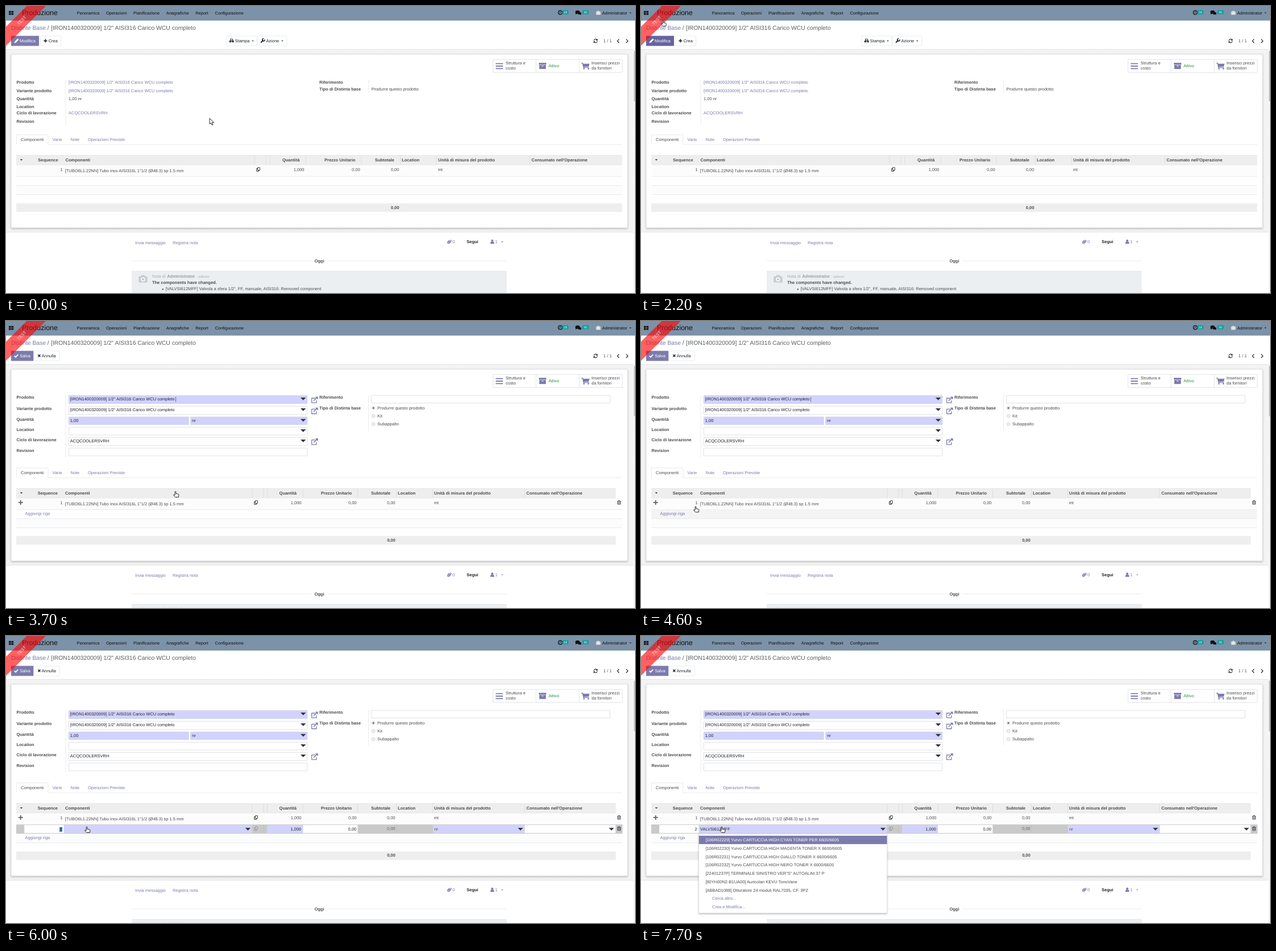
These frames come from a looping animation (1106 px wide and 506 px high, 8000 ms). An HTML page:

```html
<!DOCTYPE html>
<html lang="it">
<head>
<meta charset="utf-8">
<title>Distinta base</title>
<style>
html, body { margin: 0; width: 100%; height: 100%; overflow: hidden; background: #fff; }
svg { display: block; width: 1106px; height: 506px; }
text { font: 7.488px "Liberation Sans", Arial, sans-serif; text-rendering: geometricPrecision; white-space: pre; }
</style>
</head>
<body>
<svg id="stage" viewBox="0 0 1106 506" xmlns="http://www.w3.org/2000/svg"></svg>
<script>
const LINK = '#7c7bad', INK = '#4c4c4c', DARK = '#212529', LINE = '#dcdfe3', FIELD = '#d2d2ff';
const PRODUCT = '[IRON1400320009] 1/2" AISI316 Carico WCU completo';

// Drawing helpers, all returning markup
function text(x, y, s, { fill = INK, bold, size, anchor } = {}) {
  const style = (bold ? 'font-weight:700;' : '') + (size ? `font-size:${size}px` : '');
  return `<text x="${x}" y="${y}" fill="${fill}" text-anchor="${anchor || 'start'}" style="${style}">${s}</text>`;
}
const bold = (x, y, s, o) => text(x, y, s, { bold: true, ...o });
const link = (x, y, s) => text(x, y, s, { fill: LINK });
const right = (x, y, s, o) => text(x, y, s, { anchor: 'end', ...o });
const rect = (x, y, w, h, fill, extra = '') => `<rect x="${x}" y="${y}" width="${w}" height="${h}" fill="${fill}" ${extra}/>`;
const box = (x1, y1, x2, y2, fill = '#fff', stroke = '#c9ccd0') =>
  rect(x1 + .3, y1 + .3, x2 - x1 - .6, y2 - y1 - .6, fill, `stroke="${stroke}" stroke-width=".6" rx=".8"`);
const hline = (x1, x2, y, c = LINE) => rect(x1, y - .3, x2 - x1, .6, c);
const vline = (x, y1, y2, c = LINE) => rect(x - .3, y1, .6, y2 - y1, c);
const path = (d, fill, stroke = 'none', w = 1) => `<path d="${d}" fill="${fill}" stroke="${stroke}" stroke-width="${w}"/>`;
const at = (x, y, s) => `<g transform="translate(${x} ${y})">${s}</g>`;
const group = (id, s) => `<g id="${id}">${s}</g>`;
const tri = (x, y, w, c = DARK) => path(`M${x - w / 2},${y - w / 4}h${w}l${-w / 2},${w / 2}z`, c);

// Icons, centred on the given point
const icons = {
  pencil: c => path('M-4,4l.6-2.6L2-4l2,2L-1.4,3.4z', c),
  plus: c => path('M-3,0H3M0-3V3', 'none', c, 1.7),
  check: c => path('M-3.2,0L-1,2.3 3.3-2.2', 'none', c, 1.7),
  cross: c => path('M-2-2L2,2M2-2L-2,2', 'none', c, 1.6),
  printer: c => path('M-3.8,3v-3.4h1.2V-3.6H1.6l1,1V-.4h1.2V3z', c) + rect(-1.7, -2.6, 3.2, 2, '#fff') + rect(-1.7, 1.2, 3.4, 1.2, '#fff'),
  wrench: c => path('M-3.4,3.2L1,-1', 'none', c, 2) + path('M3.5-2.2A2.2,2.2 0 1 1 1.6-3.8', 'none', c, 1.5),
  refresh: c => path('M-3,-.4A3.1,3.1 0 0 1 2.5-2M3,.4A3.1,3.1 0 0 1-2.5,2', 'none', c, 1.1) + path('M3.6-3.8V-.6H.5zM-3.6,3.8V.6H-.5z', c),
  bars: c => [-5.2, -.9, 3.4].map(y => rect(-6.5, y, 13, 1.8, c, 'rx=".6"')).join(''),
  archive: c => rect(-6.5, -5.5, 13, 3.2, c) + rect(-5.8, -1.6, 11.6, 7, c) + rect(-1.6, -.4, 3.2, 1, '#fff'),
  cart: c => path('M-7.5-5.2h2.4L-3.4,2.6H6', 'none', c, 1.4) + path('M-4.8-4H7L5.8,1-3.6,1.6z', c) +
    `<circle cx="-2.7" cy="4.8" r="1.4" fill="${c}"/><circle cx="5" cy="4.8" r="1.4" fill="${c}"/>`,
  camera: c => path('M-4-2.2h2l.8-1.4h2.4l.8,1.4h2V3.4H-4z', c) + '<circle cy=".5" r="1.6" fill="none" stroke="#fff" stroke-width=".8"/>',
  clock: c => `<circle r="3.4" fill="none" stroke="${c}" stroke-width="1.2"/>` + path('M0-2V.6H-1.8', 'none', c, .9),
  chat: c => `<ellipse cx="-1" cy="-.8" rx="4" ry="2.9" fill="${c}"/><ellipse cx="2.6" cy="1.4" rx="3" ry="2.2" fill="${c}"/>` + path('M-4,1l-.8,2.6L-1,2zM3,3l2.4,1.4-.4-2z', c),
  clip: c => path('M1.6-1L-.9,1.5a.6,.6 0 0 1-1-1L1.2-2.5a1.3,1.3 0 0 1 1.8,1.8L-.4,2.8a1.9,1.9 0 0 1-2.7-2.7L-.6-2.5', 'none', c, 1.05),
  user: c => `<circle cy="-1.8" r="2" fill="${c}"/>` + path('M-3.4,3.6q0-3.6 2-3.6h2.8q2,0 2,3.6z', c),
  copy: c => path('M-1.2-3.2h3.8V1.6h-3.8zM-1.2-1.6h-1.8V3.4H.8V1.6', 'none', c, .9),
  trash: c => path('M-2.4-2V3.2H2.4V-2M-3.3-2.2H3.3M-1-2.4V-3.4H1V-2.4M-.9-.8V2M.9-.8V2', 'none', c, .8),
  move: c => path('M-3,0H3M0-3V3', 'none', c, 1) + path('M-4,0l1.6-1.5v3zM4,0l-1.6-1.5v3zM0-4l-1.5,1.6h3zM0,4l-1.5-1.6h3z', c),
  external: c => path('M1-3H-5V5.2H3.2V1', 'none', c, 1.3) + path('M-1.6,1.6L4-4', 'none', c, 1.6) + path('M1-5.6H6V-.6z', c),
};
const icon = (name, x, y, c = DARK) => at(x, y, icons[name](c));

function header() {
  const menu = [['Panoramica', 124.5], ['Operazioni', 176], ['Pianificazione', 224], ['Anagrafiche', 281.7], ['Report', 333.2], ['Configurazione', 367.6]];
  const badge = (x, s) => rect(x, 7.6, 11, 7, '#00a09d', 'rx="1.6"') + text(x + 5.5, 13.1, s, { fill: '#fff', size: 5.4, anchor: 'middle' });
  const tiles = [5, 9.5].flatMap(x => [8.8, 12.6].map(y => rect(x, y, 3.7, 3, '#111'))).join('');
  const crumb = (x, s, fill = '#5a5e62') => text(x, 42.2, s, { fill, size: 10.37 });
  return rect(0, 0, 1106, 25.4, '#7c92a8') + hline(0, 1106, 25.1, '#71869b') + tiles
    + text(28, 16.4, 'Produzione', { fill: '#111', size: 12.44 })
    + menu.map(([s, x]) => text(x, 14.7, s, { fill: '#111' })).join('')
    + icon('clock', 974.5, 11.5, '#111') + badge(978, 28) + icon('chat', 1006, 11.5, '#111') + badge(1013.5, 95)
    + icon('camera', 1041.5, 12, '#d5dbe0') + text(1048.3, 14.7, 'Administrator', { fill: '#111' }) + tri(1098, 12.3, 3.6, '#111')
    + crumb(9, 'Distinte Base', LINK) + crumb(72.8, '/') + crumb(79, PRODUCT)
    + icon('refresh', 1036.7, 61.6) + text(1050.6, 64.2, '1 / 1')
    + path('M1078,58.4l-3,3.3 3,3.3M1090.5,58.4l3,3.3-3,3.3', 'none', DARK, 1.2);
}

const solidButton = (x2, id) => rect(9, 52.6, x2 - 9, 17.8, LINK, `id="${id}"`);
const plainButton = (x1, x2) => box(x1, 52.6, x2, 70.4, '#fff', LINE);

function toolbarView() {
  return solidButton(58, 'modify') + icon('pencil', 18.6, 61.3, '#fff') + text(24, 64, 'Modifica', { fill: '#fff' })
    + plainButton(60, 97) + icon('plus', 69.4, 61.3) + text(74.7, 64, 'Crea', { fill: DARK })
    + plainButton(387, 441.5) + icon('printer', 396.7, 61.3) + text(402.6, 64, 'Stampa', { fill: DARK }) + tri(434, 61.6, 3.8)
    + plainButton(442, 494) + icon('wrench', 451.5, 61.3) + text(457.4, 64, 'Azione', { fill: DARK }) + tri(485.8, 61.6, 3.8);
}

function toolbarEdit() {
  return solidButton(48.3, 'save') + icon('check', 18, 61.4, '#fff') + text(24.2, 64, 'Salva', { fill: '#fff' })
    + plainButton(50, 94.5) + icon('cross', 58.4, 61.3) + text(62.8, 64, 'Annulla', { fill: DARK });
}

function sheet(dy) {
  return rect(0, 77, 1103, 322 + dy, 'url(#weave)') + hline(0, 1103, 76.7, '#cfd3d7')
    + rect(9, 85, 1084, 306 + dy, '#fff', 'stroke="#c8c8d3" stroke-width=".6" filter="url(#shade)"')
    + box(856, 94, 1084, 117.5, '#fff', '#ced0d8') + vline(932, 94, 117.5, '#ced0d8') + vline(1008, 94, 117.5, '#ced0d8')
    + icon('bars', 867.5, 106, LINK) + text(878.5, 103, 'Struttura e') + text(878.5, 111.7, 'costo')
    + icon('archive', 943.5, 105.7, LINK) + text(954, 107.7, 'Attivo', { fill: '#28953f' })
    + icon('cart', 1019, 105.8, LINK) + text(1029.5, 103, 'Inserisci prezzi') + text(1029.5, 111.7, 'da fornitori');
}

const LABELS = ['Prodotto', 'Variante prodotto', 'Quantità', 'Location', 'Ciclo di lavorazione', 'Revision'];
const labels = ys => LABELS.map((s, i) => bold(18.5, ys[i], s)).join('');

function formView() {
  return labels([137.3, 151.7, 165.7, 180.3, 191.3, 205.7]) + vline(105, 130, 210)
    + link(110, 137.3, PRODUCT) + link(110, 151.7, PRODUCT) + text(110, 165.7, '1,00 nr') + link(110, 191.3, 'ACQCOOLERSVRH')
    + bold(551, 137.3, 'Riferimento') + bold(551, 149, 'Tipo di Distinta base') + vline(637.5, 130, 154) + text(642.5, 149, 'Produrre questo prodotto');
}

function formEdit() {
  const input = (y, s, { x = 110, x2 = 530, fill = '#fff', drop = true, h = 14.3 } = {}) =>
    box(x, y, x2, y + h, fill) + text(x + 2.8, y + 9.3, s, { fill: DARK }) + (drop ? tri(522.6, y + 6.4, 9.4, '#33333f') : '');
  const radio = (y, s, on) => `<circle cx="646" cy="${y}" r="2.9" fill="#eee" stroke="#c4c4c4" stroke-width=".6"/>`
    + (on ? `<circle cx="646" cy="${y}" r="1.3" fill="#555"/>` : '') + text(653, y + 2.3, s);
  return labels([137.3, 157.3, 175.7, 194.3, 211.5, 231.3]) + vline(105, 130, 241)
    + input(131, PRODUCT, { fill: FIELD, h: 15 }) + input(150, PRODUCT, { h: 15 })
    + input(168.8, '1,00', { fill: FIELD, x2: 321.5, drop: false }) + input(168.8, 'nr', { fill: FIELD, x: 324.3 })
    + input(187, '') + input(205, 'ACQCOOLERSVRH', { h: 15 }) + input(223.8, '', { drop: false })
    + [139, 158.3, 212.6].map(y => icon('external', 542.6, y, LINK)).join('')
    + bold(551, 137.3, 'Riferimento') + bold(551, 155.7, 'Tipo di Distinta base') + vline(637.5, 130, 194)
    + box(642, 130.8, 1062.5, 145) + radio(153.4, 'Produrre questo prodotto', true) + radio(167.5, 'Kit') + radio(181.8, 'Subappalto');
}

const tabs = dy => at(0, dy, hline(74, 1083.5, 244.3) + path('M18.3,244.3V227h55.6v17.3', 'none', '#d5d8dc', .6)
  + text(26, 238.3, 'Componenti') + link(81.5, 238.3, 'Varie') + link(113.5, 238.3, 'Note') + link(144, 238.3, 'Operazioni Previste'));

// heads: x of column titles; ends: right edges of numbers; seps: header dividers
function table({ dy, end, heads, ends, seps, unitX, copyX, seqEnd }) {
  const titles = ['Componenti', 'Quantità', 'Prezzo Unitario', 'Subtotale', 'Location', 'Unità di misura del prodotto', "Consumato nell'Operazione"];
  return at(0, dy, rect(18, 263, end - 18, 17, '#eee') + hline(18, end, 263.2) + hline(18, end, 280.2, '#d3d6da') + tri(27, 271.3, 4.6)
    + right(seqEnd, 273.8, 'Sequence', { bold: true }) + titles.map((s, i) => bold(heads[i], 273.8, s)).join('')
    + seps.map(x => vline(x, 264, 280, '#d3d3d3')).join('')
    + rect(18, 280.5, 1065.5, 19.6, '#fcfcfc') + rect(18, 316.6, 1065.5, 15.8, '#fcfcfc')
    + [300.4, 316.4, 332.4].map(y => hline(18, 1083.5, y)).join('')
    + right(99.6, 290.8, '1') + text(103.7, 293, '[TUBO6L1.22NN] Tubo inox AISI316L 1"1/2 (Ø48.3) sp 1.5 mm') + icon('copy', copyX, 288)
    + ['1,000', '0,00', '0,00'].map((s, i) => right(ends[i], 290.8, s)).join('') + text(unitX, 290.8, 'mt'));
}
const total = (y, end, x) => rect(18, y, end - 18, 15, '#eee') + right(x, y + 9.7, '0,00', { bold: true });

const chatter = dy => at(0, dy, rect(0, 399, 1103, 140, '#fff') + hline(0, 1103, 398.8, '#d3d6da')
  + link(227, 419.5, 'Invia messaggio') + link(293, 419.5, 'Registra nota')
  + icon('clip', 779.8, 415.6, LINK) + link(785, 418.4, '0') + bold(810, 418.4, 'Segui', { fill: DARK })
  + icon('user', 855, 415.6, LINK) + link(860, 418.4, '1') + tri(872.5, 416, 3.6, LINK)
  + hline(221, 537, 449.4) + hline(565, 880, 449.4) + bold(551, 452, 'Oggi', { anchor: 'middle' })
  + rect(221, 467.7, 659.5, 60, '#eceff1') + hline(221, 880.5, 467.7)
  + at(241, 481, `<g transform="scale(1.9)">${icons.camera('#c6cbd0')}</g>`)
  + text(257, 479, 'Nota di', { fill: '#a9adb2' }) + bold(283.2, 479, 'Administrator', { fill: '#989da3' }) + text(334.5, 479, '- adesso', { fill: '#a9adb2', size: 6 })
  + bold(257, 490.4, 'The components have changed.')
  + '<circle cx="275.8" cy="499.4" r="1.2" fill="#4c4c4c"/>' + text(280.5, 501.4, '[VALVSI612MFF] Valvola a sfera 1/2", FF, manuale, AISI316: Removed component'));

function newRow() {
  const cells = [[32, 102, '#fff'], [102, 432.5, FIELD], [459, 522, FIELD], [522, 618.5, '#fff'], [750.5, 912, FIELD], [912, 1072, '#fff']];
  return cells.map(([a, b, c]) => rect(a, 333, b - a, 14.6, c, 'stroke="#ccc" stroke-width=".4"')).join('')
    + [425.4, 904.6, 1064.6].map(x => tri(x, 340.6, 9.2, '#33333f')).join('')
    + vline(453, 332.6, 348, '#b8b8b8') + vline(686.5, 332.6, 348, '#bdbdbd') + icon('copy', 439.6, 339.6, '#999')
    + right(519, 342.7, '1,000', { fill: DARK }) + right(616, 342.7, '0,00', { fill: DARK }) + right(684.5, 342.3, '0,00', { fill: '#666' })
    + text(753, 342.7, 'nr') + icon('trash', 1078, 339.6)
    + group('picked', rect(94, 337, 5, 8.3, '#3b87d8')) + right(98.6, 342.9, '2', { fill: DARK })
    + link(33.6, 358.2, 'Aggiungi riga') + hline(18, 1083.5, 348.3);
}

function dropdown() {
  const items = ['[106R02229] Yurvo CARTUCCIA HIGH CYAN TONER PER 6600/6605', '[106R02230] Yurvo CARTUCCIA HIGH MAGENTA TONER X 6600/6605',
    '[106R02231] Yurvo CARTUCCIA HIGH GIALLO TONER X 6600/6605', '[106R02232] Yurvo CARTUCCIA HIGH NERO TONER X 6600/6605',
    '[22401237P] TERMINALE SINISTRO VER"S" AUTOALIM.37 P', '[90YH00N2-B1UA00] Auricolari KEVU TonoVane',
    '[ABBAD1088] Otturatore 24 moduli RAL7035, CF. 3PZ', 'Cerca altro...', 'Crea e Modifica...'];
  const fill = i => i === 0 ? '#fff' : i > 6 ? LINK : INK;
  return rect(101.6, 349.2, 331.2, 139.2, '#fff', 'stroke="#ccc" stroke-width=".6" filter="url(#shade)"') + rect(101.9, 352.1, 330.6, 14.8, LINK)
    + items.map((s, i) => text(i > 6 ? 125 : 113.4, 362.2 + i * 14.75, s, { fill: fill(i) })).join('');
}

const viewTable = table({ dy: 0, end: 1083.5, seqEnd: 91.6, heads: [104.6, 486, 560, 648.7, 696, 760, 924], ends: [524.5, 622.6, 691.2],
  seps: [437, 457, 464, 527, 625, 693.5, 757, 921], unitX: 759.4, copyX: 443.7 });
const editTable = table({ dy: 32, end: 1072.3, seqEnd: 91, heads: [104, 480.6, 553.8, 642, 689, 752.8, 915], ends: [519.5, 616.5, 684.5],
  seps: [433, 453, 459.5, 522, 618.5, 686.5, 750.5, 912], unitX: 752.5, copyX: 439.6 });

const stage = document.getElementById('stage');
stage.innerHTML = `<defs>
  <pattern id="weave" width="4" height="4" patternUnits="userSpaceOnUse">${rect(0, 0, 4, 4, '#f4f4f4')}${path('M0,4L4,0', 'none', '#ebebeb', .8)}${path('M0,0L4,4', 'none', '#f9f9f9', .8)}</pattern>
  <filter id="shade" x="-5%" y="-5%" width="110%" height="112%"><feDropShadow dx="0" dy="1.6" stdDeviation="1.8" flood-opacity=".25"/></filter>
  </defs>` + rect(0, 0, 1106, 506, '#fff') + header()
  + group('view', toolbarView() + sheet(0) + formView() + tabs(0) + viewTable + total(348, 1083.5, 691.4) + chatter(0))
  + group('edit', toolbarEdit() + sheet(32) + formEdit() + tabs(32) + editTable + icon('move', 25.8, 320) + icon('trash', 1078, 320)
    + group('hoverRow', rect(18, 332.7, 1065.5, 15.4, '#f4f4f4')) + group('greyRow', rect(18, 332.4, 1066, 15.8, '#c9c9c9'))
    + group('addLink', link(33.6, 342.2, 'Aggiungi riga')) + group('newRow', newRow())
    + group('total', total(379.2, 1072.3, 684.7)) + chatter(31.7)
    + group('caretTop', vline(298.4, 134, 142.5, DARK)) + group('caretCell', vline(104.4, 336.5, 345, DARK))
    + group('typed', text(104, 342.7, 'VALVSI612MFF', { fill: DARK })) + group('list', dropdown()))
  + rect(1103, 77, 3, 429, '#f6f6f6') + rect(1104, 79, 2, 89, '#c2c4c6')
  + path('M0,36.5L36.5,0H70L0,70z', 'rgba(255,0,0,.62)')
  + `<g transform="translate(28.2 26.2) rotate(-45)">${text(0, 1.6, 'TEST', { fill: '#fbe9e9', anchor: 'middle' })}</g>`
  + group('arrow', path('M0,0V10.2L2.4,8.1 4.2,12 6,11.2 4.3,7.4H7.4z', '#fff', '#111', .9))
  + group('hand', path('M-.9,.9Q-.9,0 0,0T.9,.9V3.9L4.7,4.6Q6,5 5.9,6.2L5.3,10H-.2L-3.2,6.8Q-3.6,5.6-2.5,5.7L-.9,6.6z', '#fff', '#111', .9));

// Pointer stops: time, x, y; it turns into a hand over the toolbar
const HAND_FROM = 1800;
const stops = [[0, 358, 198], [500, 352, 200.5], [700, 322, 215], [800, 285, 232], [900, 259, 243], [1800, 110, 120], [1900, 48, 60],
  [2200, 38.5, 25.5], [2300, 42, 46], [2400, 45, 64], [2600, 43, 61], [3000, 66, 85], [3200, 130, 180], [3300, 223, 298],
  [3500, 318, 306], [3700, 298, 300.5], [3900, 240, 310], [4000, 156, 319], [4200, 136, 315], [4300, 120, 319], [4600, 96, 327],
  [4700, 78, 333], [4900, 84, 336], [5100, 75, 337], [5300, 68, 338], [5400, 61, 339], [5800, 128, 338.5], [6000, 142, 336.5]];

const el = id => document.getElementById(id);
const show = (id, on) => el(id).setAttribute('display', on ? 'inline' : 'none');

function update(t) {
  const between = (a, b = 8000) => t >= a && t < b;
  const [, x, y] = stops.findLast(s => s[0] <= t);
  for (const id of ['arrow', 'hand']) el(id).setAttribute('transform', `translate(${x} ${y})`);
  show('arrow', t < HAND_FROM);
  show('hand', t >= HAND_FROM);
  show('view', t < 3700);
  show('edit', t >= 3700);
  el('modify').setAttribute('fill', between(1900) ? '#65649e' : LINK);
  show('caretTop', between(3700, 4900));
  show('hoverRow', between(4600, 5600));
  show('greyRow', between(5600));
  show('addLink', t < 6000);
  el('addLink').firstChild.setAttribute('fill', between(5300, 6000) ? '#53528a' : LINK);
  show('newRow', between(6000));
  el('total').setAttribute('transform', `translate(0 ${between(6000) ? .6 : 0})`);
  show('picked', between(6000, 6500));
  show('caretCell', between(6500, 7700));
  show('list', between(6900));
  show('typed', between(7700));
}

const start = performance.now();
function tick(now) {
  update(Math.max(0, now - start) % 8000);
  requestAnimationFrame(tick);
}
update(0);
requestAnimationFrame(tick);
</script>
</body>
</html>
```
